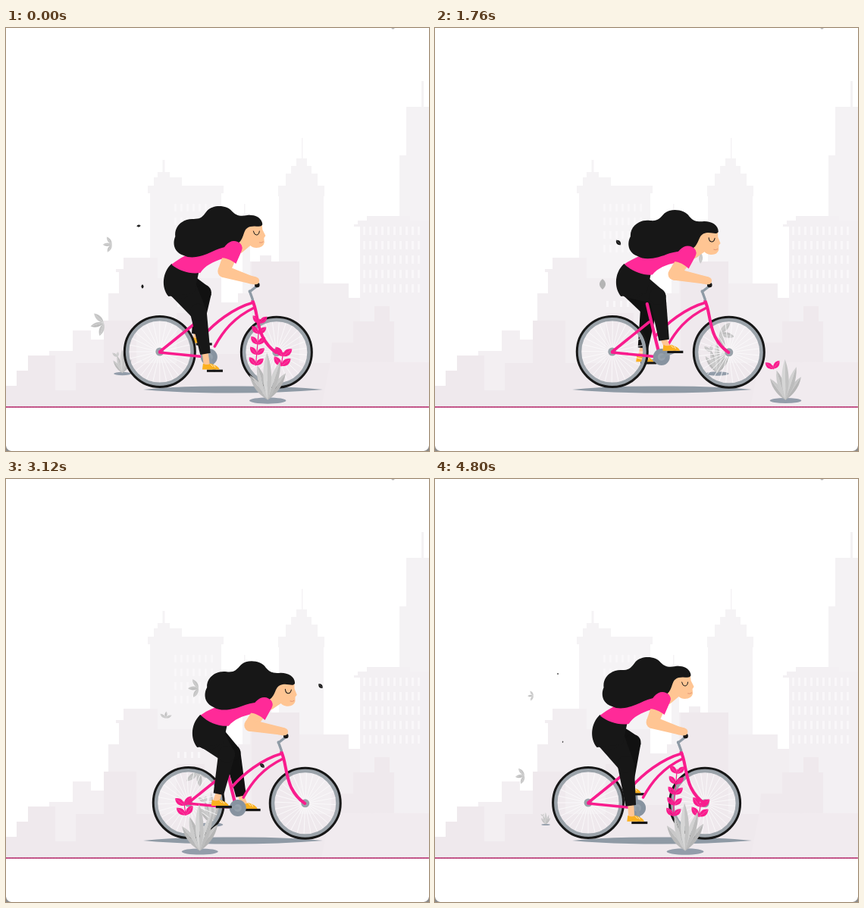
These frames come from a looping animation (558x558 px, 4880 ms). An HTML page:

```html
<!DOCTYPE html>
<html lang="en">
<head>
<meta charset="utf-8">
<title>City ride</title>
<style>
html, body { margin: 0; width: 100%; height: 100%; overflow: hidden; background: #fff; }
svg { display: block; width: 100vw; height: 100vh; }
</style>
</head>
<body>
<svg viewBox="0 0 558 558" xmlns="http://www.w3.org/2000/svg">
  <g id="city"></g>
  <path d="M0 500H558" stroke="#bb5a8b" stroke-width="1.6"/>
  <path d="M0 500H558" stroke="#b8125c" stroke-width="1.6" stroke-dasharray="1 1"/>
  <path d="M181 477Q230 472 299 472.500Q370 472 418 477Q360 481.500 299 481.500Q230 481.500 181 477Z" fill="#8f9aa5"/>
  <g id="back"></g>
  <g id="bike"></g>
  <g id="front"></g>
  <path d="M0 551Q1 557 7 558H0ZM558 551Q557 557 551 558H558Z" fill="#8c8c8c"/>
  <ellipse cx="510.500" cy="0" rx="2" ry="1.500" fill="#b5b5b5"/>
</svg>
<script>
const LOOP = 4880, STEP = 80, CYCLE = 4700, RAD = Math.PI / 180;
const PINK = '#f91c8d', INK = '#171717', SKIN = '#ffc593', STEEL = '#8e9aa5';
const $ = id => document.getElementById(id);
const n = v => +v.toFixed(2);
const clamp = v => Math.max(0, Math.min(1, v));
const smooth = (a, b, v) => { const p = clamp((v - a) / (b - a)); return p * p * (3 - 2 * p); };
const path = (d, fill) => `<path d="${d}" fill="${fill}"/>`;
const line = (d, color, w) =>
  `<path d="${d}" fill="none" stroke="${color}" stroke-width="${w}" stroke-linecap="round" stroke-linejoin="round"/>`;
const disc = (x, y, r, fill) => `<circle cx="${n(x)}" cy="${n(y)}" r="${r}" fill="${fill}"/>`;
const rect = (x, y, w, h, fill) => `<rect x="${n(x)}" y="${n(y)}" width="${w}" height="${h}" fill="${fill}"/>`;
const group = (x, y, rot, scale, body) =>
  `<g transform="translate(${n(x)} ${n(y)}) rotate(${n(rot)}) scale(${n(scale)})">${body}</g>`;

// ---- skyline -------------------------------------------------------------
function windows(x0, y0, cols, rows, dx, dy, h) {
  let s = '';
  for (let r = 0; r < rows; r++)
    for (let c = 0; c < cols; c++) s += rect(x0 + c * dx, y0 + r * dy, 3, h, '#f9f7f9');
  return s;
}
function drawCity() {
  const far = '#f5f3f5', mid = '#f2eef1', near = '#efe9ed';
  $('city').innerHTML =
    path('M190 500V218H187V208H195V197H200V190H206.500V174H209.500V190H216V197H232V208H287V218H284V500Z', far) +
    windows(222, 232, 7, 4, 8, 18, 10) +
    path('M312 500V245H314V232H315.500V245H322V500Z', far) +
    path('M360 500V222H359V208H369V192H376V182H383V172H390V145H391.500V172H397V182H403V192H411V208H420V222H419V500Z', far) +
    path('M519 500V168H528V104H548V70H551V104H558V500Z', '#f4f2f4') +
    path('M467 500V262H459V259H464V254H476V248H533V254H558V500Z', '#f3f0f3') +
    windows(471, 262, 10, 5, 8, 19, 11) +
    path('M135 500V350H149V322H145V318H155V303H200V330H284V362H306V350H322V308H335V300H350V308H387V337H452V356H467V500Z', mid) +
    path('M0 500V472H14V452H29V432H57V426H88V399H112V411H130V500Z', '#f3eff2') +
    windows(226, 360, 4, 1, 9, 9, 8) +
    path('M0 500V472H14V452H29V432H65V478H92V442H129V386H172V442H225V376H262V430H324V308H387V442H428L430 415H458V387H486V367H506V387H512V441H558V500Z', near) +
    path('M428 440L416 500H558V441Z', '#f1ebef');
}

// ---- foliage -------------------------------------------------------------
function blade(len, w, rot, a, b) {
  const side = k => `M0 0C${n(k * w * .7)} ${n(-len * .25)} ${n(k * w * 1.2)} ${n(-len * .6)} 0 ${-len}Z`;
  return group(0, 0, rot, 1, path(side(-1), a) + path(side(1), b));
}
function bush() {
  return blade(41, 6.5, -36, '#b9b9b9', '#c8c8c8') + blade(43, 6.5, 34, '#c6c6c6', '#b5b5b5') +
    blade(48, 7, -17, '#cbcbcb', '#b9b9b9') + blade(54, 7, 18, '#d2d2d2', '#bcbcbc') +
    blade(63, 7.5, -1, '#d6d6d6', '#c3c3c3');
}
function sprig(x, y, rot, pairs, gap, size) {
  let s = line(`M0 0V${-pairs * gap + gap * .6}`, PINK, 1.2);
  for (let i = 0; i < pairs; i++)
    for (const k of [-1, 1])
      s += group(0, -i * gap, k * 44, 1, blade(size, size * .34, 0, PINK, PINK));
  return group(x, y, rot, 1, s);
}
const shade = (rx, ry) => `<ellipse rx="${rx}" ry="${ry}" fill="#939daa"/>`;

function frontPlant(t, start, place, sprigs) {
  const u = t < start ? t + CYCLE : t, p = (u - start) / 2420;
  if (p <= 0 || p >= 1) return '';
  const size = Math.pow(4 * p * (1 - p), .18);
  return group(place(u), 491.5, 0, size, shade(24.5, 4.2) + sprigs(p) + group(0, -1, 0, 1, bush()));
}
const tallPlant = t => frontPlant(t, 3720, u => {
  const v = u - 4160;
  return 433 - .1711 * v + .000016 * v * v;
}, p => {
  const open = smooth(.1, .45, p);
  return sprig(-16, -47, 5 - 2 * smooth(.4, .7, p), 5, 14, 9 + 5 * open) +
    sprig(18, -46, 8, p < .3 ? 1 : 2, 13, 16);
});
const lowPlant = t => frontPlant(t, 1480, u => 462.5 - .152 * (u - 1760),
  p => sprig(-19, -49, -8, p < .25 ? 1 : p < .55 ? 3 : 2, 13, 16));

function farPlant(t) {
  const u = t < 480 ? t + CYCLE : t;
  const size = Math.min(smooth(460, 620, u), 1 - smooth(4580, 4960, u));
  if (size <= 0) return '';
  return group(456 - .0745 * (u - 640), 456, 0, size, shade(15, 2.8) +
    group(0, -1, 0, .66, bush()) +
    group(-9, -29, -50, .5, blade(22, 6, 0, '#c6c6c6', '#c6c6c6') + blade(18, 6, 60, '#cdcdcd', '#cdcdcd')));
}

// keys: [time, x, y], eased between neighbours
function along(keys, t) {
  let i = 0;
  while (i < keys.length - 2 && t > keys[i + 1][0]) i++;
  const [a, b] = [keys[i], keys[i + 1]], p = (t - a[0]) / (b[0] - a[0]);
  const q = p < 0 || p > 1 ? p : p * p * (3 - 2 * p);
  return [a[1] + (b[1] - a[1]) * p, a[2] + (b[2] - a[2]) * q];
}
function drift(t, from, to, keys, draw) {
  const u = t < from ? t + CYCLE : t;
  if (u > to) return '';
  const size = Math.min(smooth(from, from + 160, u), 1 - smooth(to - 420, to, u));
  return group(...along(keys, u), 0, size, draw(u));
}
const fan = (len, rot) => group(0, 0, rot, 1, group(0, len / 2, 0, 1,
  blade(len, len * .24, -58, '#c9c9c9', '#c3c3c3') + blade(len, len * .24, 58, '#c9c9c9', '#c3c3c3') +
  blade(len, len * .24, 0, '#bdbdbd', '#c6c6c6')));
const leaf = (rot, len, color) =>
  group(0, 0, rot, 1, group(0, len / 2, 0, 1, blade(len, len * .4, 0, color, color)));

const greyLeaves = t =>
  drift(t, 440, 5020, [[640, 420, 291], [1760, 345, 300], [3120, 247, 276], [4160, 175, 280], [4800, 126, 286]],
    u => fan(14, 240 + 28 * Math.sin((u - 4325) / 270))) +
  drift(t, 440, 5040, [[640, 462, 341], [1760, 385, 405], [2480, 318, 420], [3120, 255, 396], [4160, 165, 381], [4800, 112, 392]],
    u => fan(20, 45 + .052 * (u - 640))) +
  drift(t, 2700, 3700, [[2700, 230, 305], [3120, 211, 311], [3700, 178, 325]], u => fan(9, 290 + u / 40)) +
  drift(t, 300, 1100, [[300, 340, 297], [640, 317, 294], [1100, 285, 292]], () => fan(10, 250)) +
  drift(t, 1400, 2900, [[1400, 250, 338], [1760, 221, 338], [2480, 163, 333], [2900, 130, 326]],
    u => leaf(-.04 * (u - 1760), 14, '#b4b4b4'));

const darkLeaves = t =>
  drift(t, 400, 2560, [[640, 362, 378], [1760, 242, 283], [2480, 174, 343]], u => leaf(80 - .11 * (u - 640), 9, INK)) +
  drift(t, 2900, 4960, [[3120, 415, 273], [4160, 242, 310], [4700, 180, 341]], u => leaf(-40 + .14 * (u - 3120), 8, INK)) +
  drift(t, 2900, 4960, [[3120, 338, 378], [4160, 245, 283], [4700, 175, 261]], u => leaf(-45 + .08 * (u - 3120), 8, INK));

// ---- bicycle and rider ---------------------------------------------------
function wheel(x, y, spin) {
  let spokes = '';
  for (let i = 0; i < 28; i++) {
    const a = spin * RAD + i * Math.PI / 14;
    spokes += `M0 0L${n(41 * Math.cos(a))} ${n(41 * Math.sin(a))}`;
  }
  return group(x, y, 0, 1, line(spokes, '#fbfafb', .9) +
    `<circle r="43" fill="none" stroke="#9ba3aa" stroke-width="5"/>` +
    `<circle r="46.500" fill="none" stroke="${INK}" stroke-width="3"/>` + disc(0, 0, 5.5, '#99a2aa'));
}
function limb(pts, color) {
  let s = '';
  for (let i = 0; i < pts.length - 1; i++) {
    const [x, y, r] = pts[i], [X, Y, R] = pts[i + 1];
    const d = Math.hypot(X - x, Y - y), px = -(Y - y) / d, py = (X - x) / d;
    s += path(`M${n(x + px * r)} ${n(y + py * r)}L${n(X + px * R)} ${n(Y + py * R)}` +
      `L${n(X - px * R)} ${n(Y - py * R)}L${n(x - px * r)} ${n(y - py * r)}Z`, color) + disc(x, y, r, color);
  }
  return s;
}
function leg(deg, color) {
  const c = Math.cos(deg * RAD), s = Math.sin(deg * RAD);
  const knee = [256.5 + 6.5 * Math.cos((deg + 50) * RAD), 362 + 15 * Math.sin((deg - 10) * RAD)];
  const ankle = [257 + 15 * c, 417 + 14 * s];
  const px = 267.5 + 19 * c, py = 434 + 19 * s;
  return line(`M267.5 434L${n(px)} ${n(py)}`, STEEL, 4) + rect(px - 10, py - 1, 21, 3.2, INK) +
    line(`M${n(ankle[0])} ${n(ankle[1])}L${n(px - 10)} ${n(py - 6)}`, SKIN, 8) +
    group(px - 4, py - 5, 0, 1, path('M-12 4L-11 -4Q-6 -1 -1 -4Q9 -1 11 4Z', '#fbb01f') +
      line('M-1 -3L2 0M3 -2L5 1', '#fff', .8)) +
    limb([[229, 337, 20], [...knee, 11], [...ankle, 6.8]], color);
}
const frame = () =>
  line('M202.500 427L251 388M202.500 428L264 434', PINK, 3.6) +
  line('M248.500 364Q255 392 264 428', PINK, 4.2) +
  line('M326 362C298 370 274 390 260 406M327 369C300 382 286 400 275 420', PINK, 3.6) +
  line('M325 360C331 372 330 390 338 407C344 419 350 424 356 428', PINK, 4) +
  line('M325 358L321 347M321 348L330 341', STEEL, 3.4) + disc(331, 339, 3.3, INK);

function upper(lean) {
  const torso =
    path('M310 256H337L338 266L342 274L340 277L340.500 283Q339 290 330 290Q325 290 322 287L310 297L298 284Z', SKIN) +
    path('M218 312C235 298 262 288 285 281C300 276 312 283 311 291L303 310C298 306 293 304 287 304C272 308 262 314 256 323C243 325 229 321 218 312Z', '#ff2a98') +
    path('M338 259C337 250 328 246 318 247C308 249 303 247 298 242C292 234 274 232 265 241C259 249 257 252 247 252C233 251 221 262 223 275C219 284 221 296 234 300C246 306 262 300 276 293C290 287 304 288 309 281C315 273 312 265 322 262C330 260 336 264 338 259Z', INK) +
    line('M326 268Q327 273 330 273Q333.500 273 334 268', INK, 1) + line('M334 283Q337 284 339 282', '#e08f70', .9);
  const a = 5.2 * lean * RAD, c = Math.cos(a), s = Math.sin(a);
  const spin = (x, y) => [225 + (x - 225) * c - (y - 318) * s, 318 + (x - 225) * s + (y - 318) * c];
  const sleeve = spin(295, 301), elbow = [287 - 3 * lean, 321 + 4 * lean];
  const arm = limb([[...sleeve, 9], [...elbow, 8], [322, 332, 5.3], [329, 333.5, 5]], SKIN) + disc(329, 333.5, 4.8, SKIN);
  const cuff = path('M282 303C286 286 296 278 305 282C312 285 312 291 310 295L303 311C297 306 290 303 282 303Z', '#ff2a98');
  const turn = body => `<g transform="rotate(${n(5.2 * lean)} 225 318)">${body}</g>`;
  return turn(torso) + arm + turn(cuff);
}
function rider(t) {
  const sway = (1 - Math.cos((t - 240) / CYCLE * 2 * Math.PI)) / 2;
  const crank = 68 + t * 720 / CYCLE;
  $('bike').setAttribute('transform', `translate(${n(44.4 * sway - .8)} 0)`);
  $('bike').innerHTML = leg(crank + 180, '#111') + wheel(202.5, 427, t * .3) + wheel(356.5, 427.8, t * .3 + 5) + frame() +
    disc(267.5, 434, 11, '#8793a0') + disc(267.5, 434, 5, '#96a1ac') + leg(crank, INK) +
    path('M218 311C206 322 204 342 214 354L248 350L254 322Q238 322 218 311Z', INK) +
    upper(smooth(.1, .85, sway));
}

function render(t) {
  $('back').innerHTML = farPlant(t) + greyLeaves(t);
  rider(t);
  $('front').innerHTML = darkLeaves(t) + lowPlant(t) + tallPlant(t);
}

drawCity();
const begin = performance.now();
let shown = -1;
function tick() {
  const t = Math.floor((performance.now() - begin) % LOOP / STEP) * STEP;
  if (t !== shown) render(shown = t);
  requestAnimationFrame(tick);
}
tick();
</script>
</body>
</html>
```
